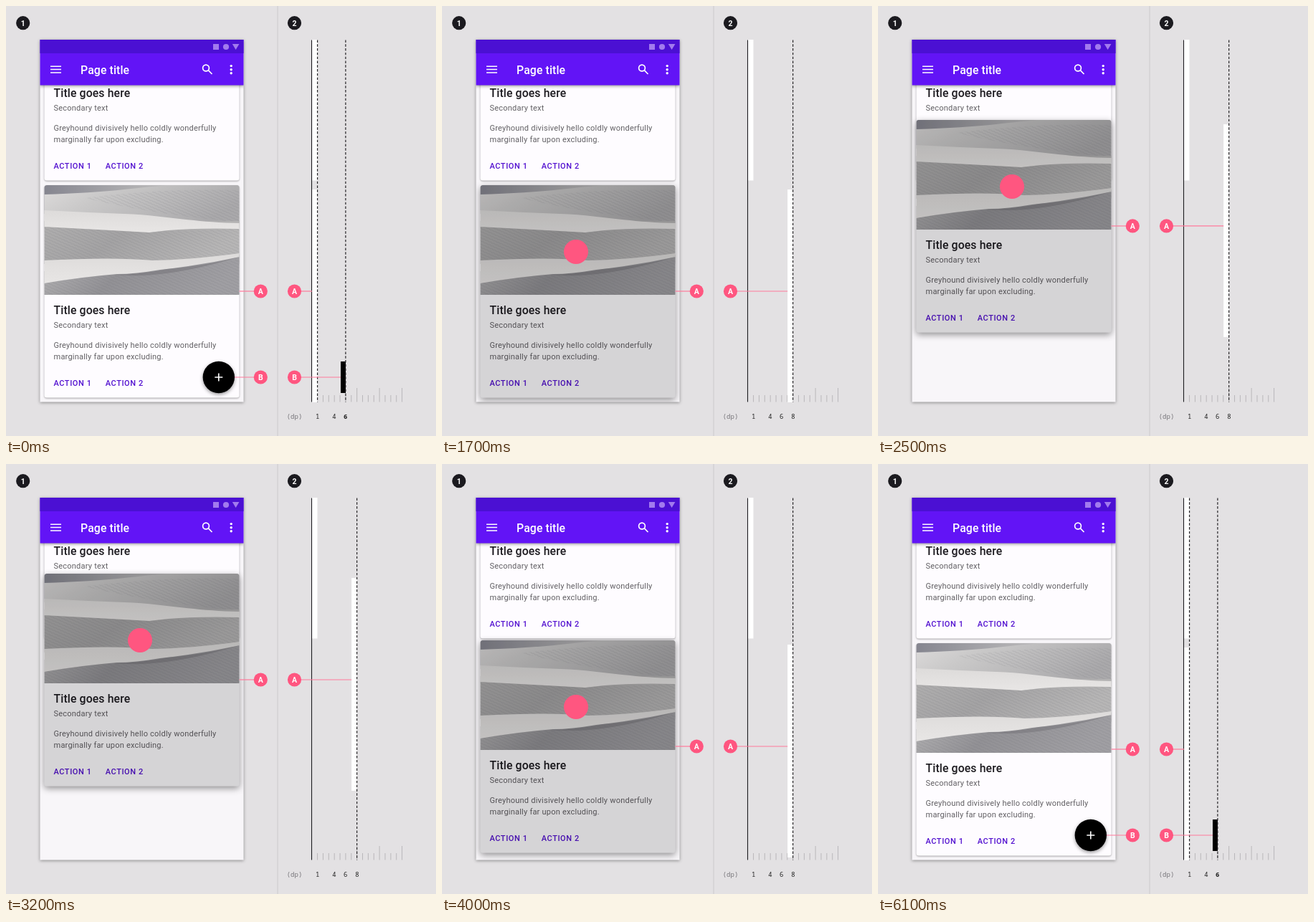
Write an HTML page that moves like this. It is 600 by 600 pixels and loops after 6.2 s.

```html
<!DOCTYPE html>
<html lang="en">
<head>
<meta charset="utf-8">
<title>Card elevation</title>
<style>
  html, body { margin: 0; width: 100%; height: 100%; overflow: hidden; background: #e3e1e3; }
  svg { display: block; width: 100vw; height: 100vh; }
  text { font-family: Roboto, sans-serif; }
  .title { font-size: 15.8px; font-weight: 500; letter-spacing: .12px; fill: #1d1b20; }
  .body { font-size: 11.05px; letter-spacing: .2px; fill: #626064; }
  .action { font-size: 11px; font-weight: 500; letter-spacing: .57px; fill: #5311d0; }
  .tag { font-size: 10.5px; font-weight: 700; fill: #fff; text-anchor: middle; }
  .dp { font: 500 9px "Noto Sans Mono", "DejaVu Sans Mono", monospace; fill: #222; text-anchor: middle; }
  .dash { stroke: #242326; stroke-width: 1.2; stroke-dasharray: 3.4 2.4; }
  .pink { fill: #ff5680; }
  .lead { stroke: #ff7a9b; stroke-width: 1.2; }
</style>
</head>
<body>
<svg viewBox="0 0 600 600" id="stage">
  <defs>
    <clipPath id="screen"><rect x="47.5" y="47" width="284" height="505.5"/></clipPath>
    <clipPath id="cardClip"><rect x="53.5" y="250" width="272" height="296.5" rx="3.5"/></clipPath>
    <clipPath id="photoClip"><path d="M53.5 403V253.500q0-3.500 3.500-3.500H322q3.500 0 3.500 3.500V403z"/></clipPath>
    <linearGradient id="sky"><stop stop-color="#85858f"/><stop offset=".5" stop-color="#b3b2b4"/><stop offset="1" stop-color="#d2d0d1"/></linearGradient>
    <linearGradient id="slopeA" x2="1" y2=".4"><stop stop-color="#dedcdc"/><stop offset=".35" stop-color="#c9c8c8"/><stop offset="1" stop-color="#aaa9ab"/></linearGradient>
    <linearGradient id="slopeB" x2="1" y2=".3"><stop stop-color="#b0afaf"/><stop offset=".45" stop-color="#a4a3a4"/><stop offset="1" stop-color="#b7b6b6"/></linearGradient>
    <linearGradient id="slopeC" x2="1" y2=".2"><stop stop-color="#b5b4b5"/><stop offset=".45" stop-color="#929195"/><stop offset="1" stop-color="#a09fa3"/></linearGradient>
    <linearGradient id="crest" x2="0" y2="1"><stop stop-color="#dddbda"/><stop offset="1" stop-color="#e8e6e5"/></linearGradient>
    <pattern id="sand" width="5" height="4" patternUnits="userSpaceOnUse" patternTransform="rotate(24)">
      <path d="M0 1.500q1.250-1 2.500 0t2.500 0" fill="none" stroke="#55555c" stroke-width=".7" opacity=".22"/>
    </pattern>
    <g id="photo" clip-path="url(#photoClip)">
      <path fill="url(#sky)" d="M53 249H326V290H53z"/>
      <path fill="url(#slopeA)" d="M53 263Q120 261 165 256T240 249H326V310H53z"/>
      <path fill="url(#sand)" d="M110 268Q220 254 326 257V302Q200 290 110 268z"/>
      <path fill="url(#slopeB)" d="M53 300H326V360H53z"/>
      <path fill="url(#sand)" d="M53 306Q190 320 326 310V348L200 356H53z"/>
      <path fill="url(#crest)" d="M53 285Q110 288 165 290C220 292 260 302 326 303V311Q250 309 200 316Q130 312 53 308z"/>
      <path fill="url(#slopeC)" d="M53 370H150Q240 366 326 347V404H53z"/>
      <path fill="url(#sand)" d="M53 384L170 374Q260 368 326 352V404H53z"/>
      <path fill="url(#crest)" d="M53 355Q150 350 205 355Q260 354 326 345V350Q270 362 215 368Q180 374 155 374Q105 378 53 387z"/>
      <path fill="#77767b" opacity=".55" d="M150 375Q190 374 225 367Q280 362 326 350Q270 367 225 373Q190 378 150 375z"/>
    </g>
    <g id="content">
      <use href="#photo"/>
      <text class="title" x="66.500" y="429.700">Title goes here</text>
      <text class="body" x="66.500" y="448.700">Secondary text</text>
      <text class="body" x="66.500" y="477.200">Greyhound divisively hello coldly wonderfully</text>
      <text class="body" x="66.500" y="493">marginally far upon excluding.</text>
      <text class="action" x="66.500" y="530">ACTION 1</text>
      <text class="action" x="138.800" y="530">ACTION 2</text>
    </g>
    <rect id="paper" x="53.5" y="250" width="272" height="296.5" rx="3.5" fill="#fefcff"/>
  </defs>

  <rect width="600" height="600" fill="#e3e1e3"/>
  <path d="M379 0V600" stroke="#cbc9cc"/>
  <g fill="#1b1a1f"><circle cx="23.700" cy="23.700" r="9.600"/><circle cx="402.500" cy="23.700" r="9.600"/></g>
  <text class="tag" x="23.700" y="27.500">1</text>
  <text class="tag" x="402.500" y="27.500">2</text>

  <!-- phone -->
  <rect x="47.5" y="47" width="284" height="505.5" fill="#f8f6f9" style="filter:drop-shadow(0 1px 2px rgba(0,0,0,.4))"/>
  <g clip-path="url(#screen)">
    <g transform="translate(0 -303)">
      <use href="#paper" style="filter:drop-shadow(0 1px 1px rgba(0,0,0,.34))"/>
      <use href="#content"/>
    </g>
    <g id="card">
      <use href="#paper" id="sheet"/>
      <use href="#content"/>
      <g clip-path="url(#cardClip)"><circle id="ripple" cx="187" cy="343" r="0" fill="#000"/></g>
      <circle id="touch" class="pink" cx="187" cy="343" r="17"/>
    </g>
    <g id="fab" style="filter:drop-shadow(0 2px 2.500px rgba(0,0,0,.4))">
      <circle r="22.200"/>
      <path d="M-5.500 0H5.500M0-5.500V5.500" stroke="#fff" stroke-width="1.600"/>
    </g>
    <g style="filter:drop-shadow(0 1.500px 2px rgba(0,0,0,.45))">
      <rect x="47" y="47" width="285" height="63.5" fill="#6214f6"/>
    </g>
    <rect x="47" y="47" width="285" height="19" fill="#4b10d3"/>
    <g fill="#a27bee">
      <rect x="289" y="53" width="8" height="8"/><circle cx="307" cy="57" r="4.100"/><path d="M315.800 53H325.400L320.600 61z"/>
    </g>
    <path d="M62 84.300H77M62 88.600H77M62 92.900H77" stroke="#fff" stroke-width="1.500"/>
    <text class="title" x="104" y="95" style="fill:#fff">Page title</text>
    <g fill="none" stroke="#fff" stroke-width="1.700"><circle cx="279" cy="86.500" r="4.400"/><path d="M282.200 89.700L287.500 95"/></g>
    <g fill="#fff"><circle cx="314.200" cy="83.600" r="1.700"/><circle cx="314.200" cy="88.700" r="1.700"/><circle cx="314.200" cy="93.800" r="1.700"/></g>
  </g>

  <!-- side view -->
  <path id="ruler" stroke="#b9b7ba" fill="none"/>
  <rect x="427" y="47" width="7.500" height="196.500" fill="#fff"/>
  <rect id="cardBar" width="7.500" height="297" fill="#fff"/>
  <rect id="fabBar" x="467" width="7"/>
  <path d="M426.500 47.500V552.500" stroke="#1d1c20" stroke-width="1.100"/>
  <path id="cardDash" class="dash" d="M0 47.500V552.500"/>
  <path id="fabDash" class="dash" d="M473.900 47.500V552.500"/>

  <g id="tagA">
    <path class="lead" d="M325.500 398H350"/>
    <path class="lead" id="leadA"/>
    <circle class="pink" cx="355.300" cy="398" r="9.600"/><circle class="pink" cx="402.500" cy="398" r="9.600"/>
    <text class="tag" x="355.300" y="401.800">A</text><text class="tag" x="402.500" y="401.800">A</text>
  </g>
  <g id="tagB">
    <path class="lead" d="M319 518H350M408 518H467"/>
    <circle class="pink" cx="355.300" cy="518" r="9.600"/><circle class="pink" cx="402.500" cy="518" r="9.600"/>
    <text class="tag" x="355.300" y="521.800">B</text><text class="tag" x="402.500" y="521.800">B</text>
  </g>

  <text class="dp" x="402.500" y="576.300" style="fill:#77757a">(dp)</text>
  <text class="dp" x="434.700" y="576.300">1</text>
  <text class="dp" x="458" y="576.300">4</text>
  <text class="dp" id="six" x="473.700" y="576.300">6</text>
  <text class="dp" id="eight" y="576.300">8</text>
</svg>
<script>
  const LOOP = 6200, DP = 7.87, BASE = 426.7, LIFT = 97;
  const $ = id => document.getElementById(id);
  const set = (id, attrs) => {
    for (const k in attrs) $(id).setAttribute(k, attrs[k]);
  };
  const clamp = v => Math.min(1, Math.max(0, v));

  // Standard curve: cubic-bezier(.4, 0, .2, 1)
  function ease(x) {
    if (x <= 0 || x >= 1) return clamp(x);
    let lo = 0, hi = 1, s;
    for (let i = 0; i < 24; i++) {
      s = (lo + hi) / 2;
      const bx = 1.2 * s * (1 - s) ** 2 + .6 * s * s * (1 - s) + s ** 3;
      if (bx < x) lo = s; else hi = s;
    }
    return s * s * (3 - 2 * s);
  }
  const lin = (t, start, dur) => clamp((t - start) / dur);
  const move = (t, start, dur) => ease(lin(t, start, dur));

  let ticks = '';
  for (let i = 1; i <= 16; i++) {
    const tall = i > 4 && i % 4 === 0;
    ticks += `M${BASE + i * DP} ${tall ? 533 : 543}V552.5`;
  }
  set('ruler', { d: ticks });

  function draw(t) {
    const rise = move(t, 40, 960);
    const up = rise - move(t, 4800, 600);
    const dp = 1 + 7 * up;
    const edge = BASE + DP * dp;
    const y = -LIFT * (move(t, 1800, 1000) - move(t, 3440, 750));
    const fab = 1 - move(t, 40, 300) + move(t, 5050, 350);
    const tagB = 1 - lin(t, 40, 200) + lin(t, 5150, 250);
    const shift = `translate(0 ${y})`;

    set('card', { transform: shift });
    $('sheet').style.filter =
      `drop-shadow(0 ${1 + 2.5 * up}px ${1 + 4 * up}px rgba(0,0,0,${.34 + .08 * up}))`;
    set('ripple', { r: 257 * rise, opacity: .16 * (1 - lin(t, 4820, 450)) });
    set('touch', { opacity: lin(t, 40, 180) - lin(t, 4740, 130) });
    set('fab', { transform: `translate(296.8 518) scale(${fab})`, opacity: fab > .01 ? 1 : 0 });

    set('cardBar', { x: edge - 7.5, y: 256 + y });
    set('cardDash', { transform: `translate(${edge} 0)` });
    set('fabBar', { y: 518 - 22 * fab, height: 44 * fab });
    set('fabDash', { opacity: tagB });
    set('tagA', { transform: shift });
    set('leadA', { d: `M408 398H${edge - 7.5}` });
    set('tagB', { opacity: tagB });
    $('six').style.fontWeight = tagB > .5 ? 700 : 500;
    set('eight', { x: edge + .4, opacity: clamp((dp - 6.6) / .7) });
  }

  const start = performance.now();
  function frame() {
    draw((performance.now() - start) % LOOP);
    requestAnimationFrame(frame);
  }
  frame();
</script>
</body>
</html>
```
